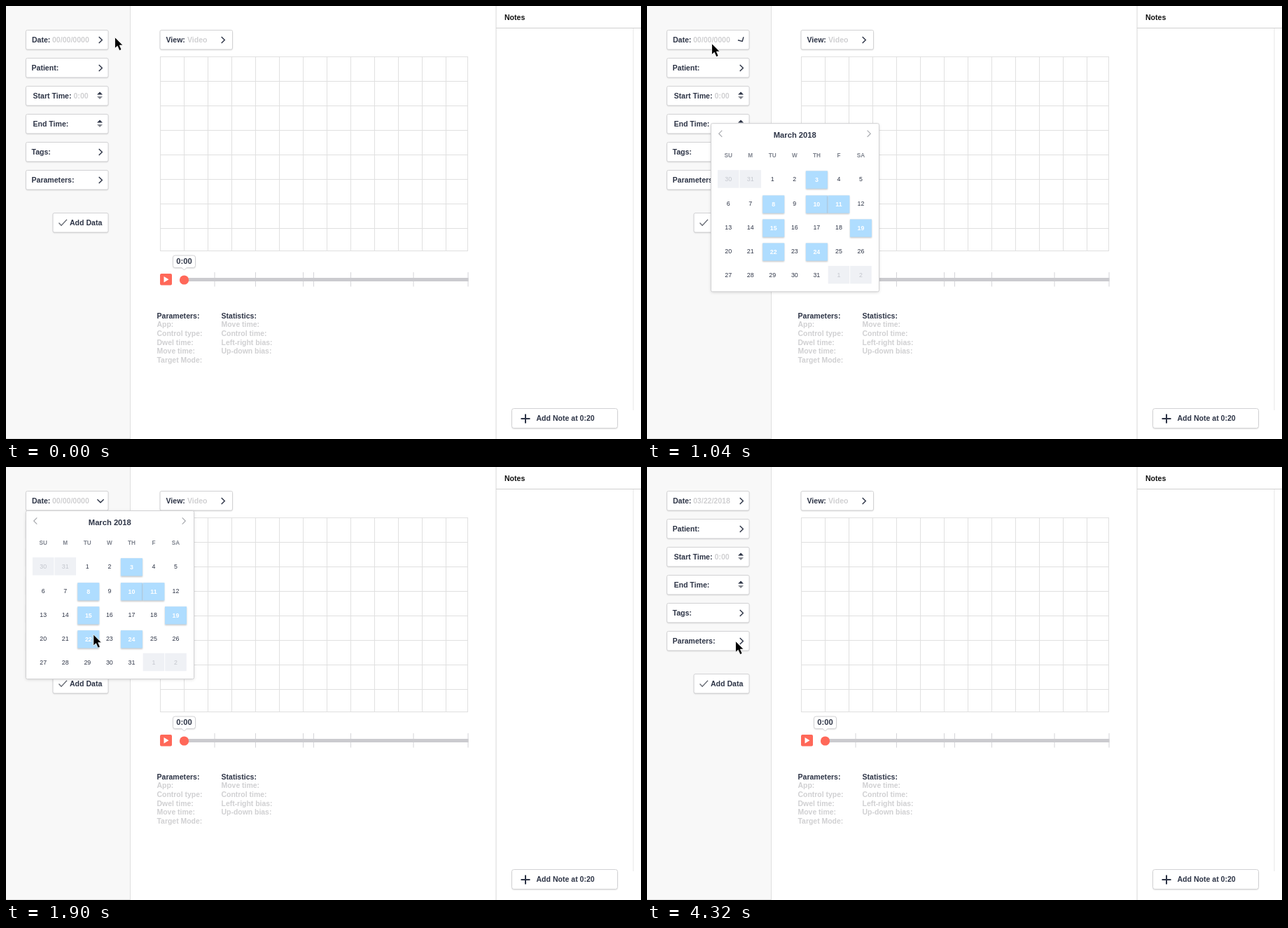
Animation, 907 px wide and 618 px high, one loop 4.38 s. Source, as an HTML page with a canvas:

```html
<!DOCTYPE html>
<html lang="en">
<head>
<meta charset="utf-8">
<title>Session date picker</title>
<style>
  html, body { margin: 0; width: 100%; height: 100%; overflow: hidden; background: #fff; }
  canvas { display: block; }
</style>
</head>
<body>
<canvas id="stage" width="907" height="618"></canvas>
<script>
const ctx = document.getElementById('stage').getContext('2d');
const LOOP = 4380;
const FONT = '"Liberation Sans", Arial, sans-serif';
const INK = '#2d3446', PALE = '#d0d0d2', EDGE = '#d2d2d4', CORAL = '#ff6859';

// Standard "ease" curve: cubic-bezier(.25, .1, .25, 1)
function ease(x) {
  if (x <= 0) return 0;
  if (x >= 1) return 1;
  const curve = (a, b, u) => 3 * a * u * (1 - u) ** 2 + 3 * b * u * u * (1 - u) + u ** 3;
  let lo = 0, hi = 1;
  for (let i = 0; i < 24; i++) {
    const mid = (lo + hi) / 2;
    if (curve(0.25, 0.25, mid) < x) lo = mid; else hi = mid;
  }
  return curve(0.1, 1, lo);
}
const tween = (time, start, length) => ease((time - start) / length);
const mix = (a, b, p) => a + (b - a) * p;

function text(str, x, y, { color = INK, size = 10.55, weight = 'bold', align = 'left' } = {}) {
  ctx.font = `${weight} ${size}px ${FONT}`;
  ctx.fillStyle = color;
  ctx.textAlign = align;
  ctx.fillText(str, x, y);
}

function path(points, { stroke, fill, width = 1, close = false }) {
  ctx.beginPath();
  points.forEach(([x, y]) => ctx.lineTo(x, y));
  if (close) ctx.closePath();
  if (fill) { ctx.fillStyle = fill; ctx.fill(); }
  if (stroke) { ctx.strokeStyle = stroke; ctx.lineWidth = width; ctx.stroke(); }
}
const line = (x1, y1, x2, y2, stroke, width = 1) =>
  path([[x1, y1], [x2, y2]], { stroke, width });

function rect(x, y, w, h, fill) {
  ctx.fillStyle = fill;
  ctx.fillRect(x, y, w, h);
}

function card(x, y, w, h, r = 2, blur = 2) {
  ctx.save();
  ctx.shadowColor = 'rgba(0,0,0,.16)';
  ctx.shadowBlur = blur;
  ctx.shadowOffsetY = 1;
  ctx.beginPath();
  ctx.roundRect(x, y, w, h, r);
  ctx.fillStyle = '#fff';
  ctx.fill();
  ctx.restore();
  ctx.strokeStyle = EDGE;
  ctx.lineWidth = 1;
  ctx.stroke();
}

function chevron(x, y, angle = 0, color = INK, width = 1.4) {
  ctx.save();
  ctx.translate(x, y);
  ctx.rotate(angle);
  path([[-2.3, -4.6], [2.3, 0], [-2.3, 4.6]], { stroke: color, width });
  ctx.restore();
}

function sorter(x, y) {
  path([[x - 4, y - 1.5], [x, y - 5.5], [x + 4, y - 1.5]], { fill: INK });
  path([[x - 4, y + 1], [x, y + 5], [x + 4, y + 1]], { fill: '#83868e' });
}

function sidebar(turn, picked) {
  rect(0, 0, 177, 618, '#f8f8f8');
  line(177.5, 0, 177.5, 618, '#e0e0e0');
  line(0, 617.5, 178, 617.5, '#e0e0e0');

  const fields = [['Date:', 37], ['Patient:', 36.5], ['Start Time:', 38.5],
                  ['End Time:', 38.5], ['Tags:', 36.5], ['Parameters:', 36.5]];
  fields.forEach(([label, x], i) => {
    const top = 34 + 40 * i;
    card(28.5, top + 0.5, 117.5, 27.5);
    text(label, x, top + 18);
    if (i === 2 || i === 3) sorter(134, top + 14);
    else chevron(135, top + 14.5, i ? 0 : turn * Math.PI / 2);
  });
  ctx.globalAlpha = 1 - picked;
  text('00/00/0000', 66, 52, { color: PALE });
  ctx.globalAlpha = picked;
  text('03/22/2018', 66, 52, { color: PALE });
  ctx.globalAlpha = 1;
  text('0:00', 96.5, 132, { color: PALE });

  card(67, 295.5, 79, 27.5);
  path([[75.5, 309.5], [79, 313.3], [87, 304.8]], { stroke: '#666a73', width: 1.3 });
  text('Add Data', 91, 313.3);
}

function player() {
  card(220, 34.5, 103.5, 27.5);
  text('View:', 228.5, 52);
  text('Video', 259, 52, { color: PALE });
  chevron(310, 48.5);

  const grid = '#e0e0e0';
  for (let x = 220.5; x < 640; x += 34) line(x, 72, x, 350, grid);
  for (let y = 72.5; y < 330; y += 35) line(220, y, 660, y, grid);
  line(659.5, 72, 659.5, 350, grid);
  line(220, 349.5, 660, 349.5, grid);

  for (const x of [298, 356.5, 424.5, 439.5, 492.5, 582, 660])
    line(x, 380, x, 400.5, '#d4d4d8');
  rect(254, 388, 406.5, 5, '#cbcbcf');

  ctx.fillStyle = CORAL;
  ctx.beginPath();
  ctx.roundRect(220, 382, 17, 16.5, 2);
  ctx.arc(254.5, 391, 6.6, 0, 7);
  ctx.fill();
  path([[225.5, 386], [232.5, 390.3], [225.5, 394.6]], { fill: '#fff' });

  card(238.5, 356, 32, 17.5, 3);
  path([[250.5, 373], [254.5, 377], [258.5, 373]], { fill: '#fff', stroke: EDGE });
  text('0:00', 254.5, 368.3, { size: 11.2, align: 'center' });
}

function summary(x, title, rows) {
  text(title, x, 445.5);
  rows.forEach((row, i) => text(row, x, 458.2 + 12.65 * i, { color: PALE, size: 10.45 }));
}

function notes() {
  line(700, 0, 700, 618, '#d8d8d8');
  line(700, 31.5, 907, 31.5, '#d0d0d0');
  line(896, 32, 896, 577, '#e6e6e6');
  text('Notes', 712, 19.7, { color: '#111' });
  card(722.5, 574.5, 151, 28, 3);
  line(735.5, 589, 748.5, 589, INK, 2);
  line(742, 582.5, 742, 595.5, INK, 2);
  text('Add Note at 0:20', 757.5, 592.3);
}

function calendar(x, y) {
  ctx.save();
  ctx.translate(x, y);
  card(0.5, 0.5, 240, 240, 2, 4);
  chevron(14, 15, Math.PI, '#a5a7ac', 1.1);
  chevron(226, 15, 0, '#a5a7ac', 1.1);
  text('March 2018', 120.3, 21, { size: 11.2, align: 'center' });

  const columnX = c => 25.2 + 31.55 * c;
  ['SU', 'M', 'TU', 'W', 'TH', 'F', 'SA'].forEach((name, c) =>
    text(name, columnX(c), 48.7, { size: 8.2, color: '#7d828d', align: 'center' }));

  const rowY = [80, 115, 149, 183, 216.7];
  const marked = [3, 8, 10, 11, 15, 19, 22, 24];
  for (let cell = 0; cell < 35; cell++) {
    const day = cell - 1, col = cell % 7;
    const cx = columnX(col), cy = rowY[Math.floor(cell / 7)];
    const style = { size: 8.8, weight: 'normal', align: 'center' };
    if (day < 1 || day > 31) {
      rect(cx - 15.3, cy - 13, 30.6, 25.5, '#eff1f5');
      text(day < 1 ? day + 31 : day - 31, cx, cy + 3, { ...style, color: '#c3c6cd' });
    } else if (marked.includes(day)) {
      const mx = col === 2 ? cx + 1.5 : cx;
      ctx.save();
      ctx.shadowColor = 'rgba(0,0,0,.22)';
      ctx.shadowBlur = 2;
      ctx.shadowOffsetY = 1;
      rect(mx - 15.5, cy - 11.8, 31, 25.3, '#afddff');
      ctx.restore();
      text(day, mx, cy + 4, { ...style, weight: 'bold', color: '#fff' });
    } else {
      text(day, cx, cy + 3, style);
    }
  }
  ctx.restore();
}

function pointer(x, y) {
  ctx.save();
  ctx.translate(x, y);
  ctx.lineJoin = 'miter';
  path([[0.5, 0.5], [0.5, 16.5], [4.2, 13.2], [7, 19.6], [10, 18.3], [7.3, 12.1], [12, 12.1]],
       { fill: '#000', stroke: '#fff', width: 0.8, close: true });
  ctx.restore();
}

function draw(time) {
  const toField = tween(time, 0, 900);
  const open = tween(time, 898, 363);
  const toDay = tween(time, 1255, 890);
  const picked = tween(time, 3360, 300);
  const close = tween(time, 3760, 350);

  rect(0, 0, 907, 618, '#fff');
  sidebar(open - close, picked);
  player();
  summary(215.5, 'Parameters:',
    ['App:', 'Control type:', 'Dwel time:', 'Move time:', 'Target Mode:']);
  summary(307.5, 'Statistics:',
    ['Move time:', 'Control time:', 'Left-right bias:', 'Up-down bias:']);
  notes();

  if (open > 0 && close < 1) {
    ctx.globalAlpha = 1 - close;
    calendar(mix(221, 28, open), mix(384.5, 62, open));
    ctx.globalAlpha = 1;
  }
  pointer(mix(mix(155, 92, toField), 126, toDay), mix(mix(44, 53, toField), 248, toDay));
}

const began = performance.now();
function tick() {
  draw((performance.now() - began) % LOOP);
  requestAnimationFrame(tick);
}
tick();
</script>
</body>
</html>
```
